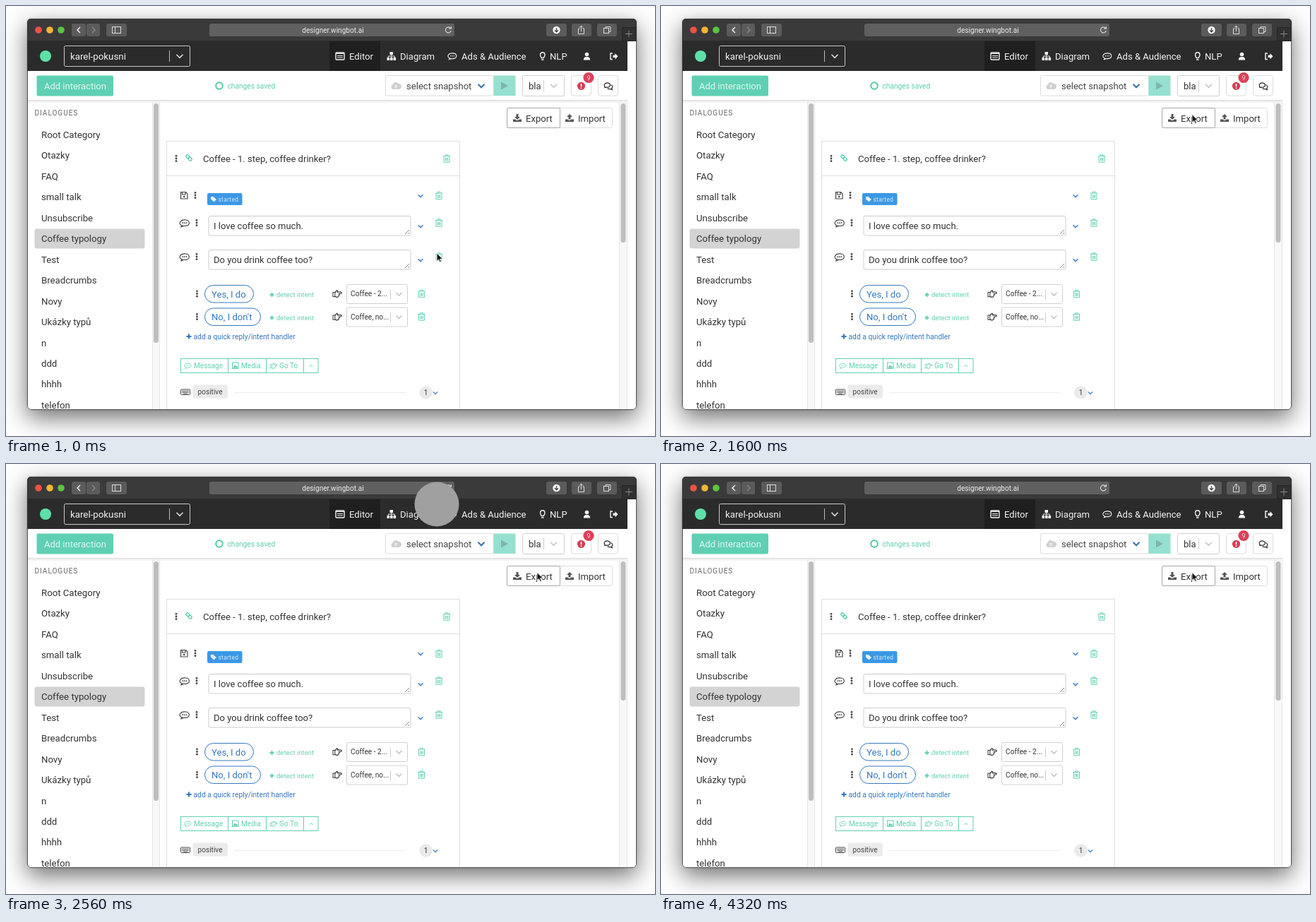
Write an HTML page that moves like this. It is 919 px wide and 609 px high and loops after 4400 ms.

```html
<!DOCTYPE html>
<html lang="en">
<head>
<meta charset="utf-8">
<title>Dialogue editor export</title>
<style>
  html, body { margin: 0; width: 100%; height: 100%; overflow: hidden; background: #fefefe; }
  #shadow {
    position: absolute; left: 30px; top: 18px; width: 863px; height: 554px; border-radius: 5px;
    box-shadow: 0 0 2px rgba(0,0,0,.35), 0 11px 33px rgba(0,0,0,.56);
  }
  svg { position: absolute; left: 0; top: 0; display: block; }
  text { font-family: Roboto, "Liberation Sans", sans-serif; white-space: pre; }
</style>
</head>
<body>
<div id="shadow"></div>
<svg id="stage" width="919" height="609" viewBox="0 0 919 609"></svg>
<script>
const GREEN = '#5fd0b3', BLUE = '#3577bf', INK = '#333';
const FRAME = 80, LOOP = 4400;

// Drawing helpers, each returning markup
const text = (x, y, s, size = 13.1, fill = INK, extra = '') =>
  `<text x="${x}" y="${y}" font-size="${size}" fill="${fill}" ${extra}>${s}</text>`;
const rect = (x, y, w, h, fill = 'none', stroke = 'none', r = 0, extra = '') =>
  `<rect x="${x}" y="${y}" width="${w}" height="${h}" rx="${r}" fill="${fill}" stroke="${stroke}" ${extra}/>`;
const circle = (x, y, r, fill, stroke = 'none', w = 1) =>
  `<circle cx="${x}" cy="${y}" r="${r}" fill="${fill}" stroke="${stroke}" stroke-width="${w}"/>`;
const line = (d, stroke, w = 1) =>
  `<path d="${d}" fill="none" stroke="${stroke}" stroke-width="${w}"/>`;
const fill = (d, color) => `<path d="${d}" fill="${color}"/>`;
const at = (x, y, ...parts) => `<g transform="translate(${x} ${y})">${parts.join('')}</g>`;
const group = (id, ...parts) => `<g id="${id}">${parts.join('')}</g>`;

// Icons, centred on x, y
const chevron = (x, y, c, s = 4, w = 1.3) => at(x, y, line(`M${-s} ${-s / 2}L0 ${s / 2}L${s} ${-s / 2}`, c, w));
const dots = (x, y) => [-3.7, 0, 3.7].map(d => circle(x, y + d, 1.4, '#444')).join('');
const plus = (x, y, c, s = 3.5) => at(x, y, line(`M${-s} 0H${s}M0 ${-s}V${s}`, c, 2));
const trash = (x, y) => at(x, y,
  line('M-5.2 -3.4H5.2M-2 -3.8V-5.2H2V-3.8M-4 -3V5.2H4V-3M-1.7 -1V3.4M0 -1V3.4M1.7 -1V3.4', GREEN, 1));
const bubble = (x, y, c, s = 1) => at(x, y, `<g transform="scale(${s})">`,
  line('M-3.6 3.6C-10 .8 -6 -4.6 0 -4.6C8.5 -4.6 8.5 4 0 4L-1.5 3.9L-5.6 5.6Z', c, 1.2),
  [-2.6, 0, 2.6].map(d => circle(d, -.3, .9, c)).join(''), '</g>');
const hand = (x, y, c, s = 1) => at(x, y, `<g transform="scale(${s})">`,
  line('M-3 -1.6L-.9 -4.4Q.6 -5 .7 -3.4L.3 -2.4H4.9Q6.3 -2.3 6.3 -1.2Q6.3 0 4.9 0H2.6Q3.5 1 2.6 2Q2.9 3.2 1.7 3.6Q1.4 4.8 0 4.8H-1.2L-3 3.8', c, 1.2),
  rect(-6, -2, 2.8, 6.2, 'none', c), '</g>');
const arrowTray = (x, y, up) => at(x, y,
  fill(up ? 'M0 -5.5L4 -1.5H1.5V2H-1.5V-1.5H-4Z' : 'M0 2.5L4 -1.5H1.5V-5.5H-1.5V-1.5H-4Z', '#555'),
  fill('M-6 2H-2.6L-1 3.6H1L2.6 2H6V5.6H-6Z', '#555'));

function titleBar() {
  const button = (x, w) => rect(x, 25, w, 18, '#5b5b5b', 'none', 3);
  return rect(30, 18, 863, 32, '#3a3a3a') + line('M30 49.5H892', '#2b2b2b')
    + circle(46, 34, 4.8, '#ed5148') + circle(62, 34, 4.8, '#f3b533') + circle(78, 34, 4.8, '#59c443')
    + button(93, 20) + button(114, 19) + button(142, 29) + button(765, 29) + button(801, 28) + button(837, 28)
    + line('M105 30L101 34L105 38', '#eee', 1.5) + line('M122 30L126 34L122 38', '#858585', 1.5)
    + rect(150.5, 29.5, 12, 9, 'none', '#ddd') + line('M154.5 29.5V38.5', '#ddd')
    + rect(288, 25, 347, 18, '#606060', 'none', 3)
    + text(463, 38, 'designer.wingbot.ai', 10.1, '#ececec', 'text-anchor="middle"')
    + line('M629.6 31.4A4 4 0 1 0 630.3 35M630.4 29V32H627', '#ddd', 1.1)
    + group('idle', circle(779.5, 34, 5.2, '#f4f4f4'), line('M779.5 31V36.4M777 34.3L779.5 36.8L782 34.3', '#444', 1.3))
    + group('busy', fill('M777.5 27H781.5V31H784.5L779.5 36L774.5 31H777.5Z', '#379df2'), rect(769, 37.5, 21, 2.5, '#379df2'))
    + line('M812.5 32H810.5V39.5H818.5V32H816.5M814.5 36V28M812 30.5L814.5 28L817 30.5', '#ddd')
    + rect(846.5, 31.5, 7, 7, 'none', '#ddd') + line('M849 31.5V29.5H856V36.5H853.5', '#ddd')
    + rect(872.5, 30.5, 20, 19, '#303030', '#252525') + line('M877 39.5H887M882 34.5V44.5', '#888');
}

function navBar() {
  const white = '#f3f3f3';
  return rect(30, 50, 850, 42, '#2b2b2b') + rect(458, 50, 72, 42, '#1f1f1f')
    + circle(56, 71, 8, '#5fe0a8')
    + rect(82.5, 56.5, 178, 29, 'none', '#c9c9c9', 2) + text(91, 76, 'karel-pokusni', 13.3, white)
    + line('M231.5 63V79', '#bbb') + chevron(246, 71, '#ddd', 4.5, 1.6)
    + rect(467, 66, 12, 10, 'none', white, 1, 'stroke-width="1.4"') + line('M467 67.5H479M469 70.5H477M469 73H477', white, 1.2)
    + text(486, 76, 'Editor', 13.1, white)
    + rect(543.5, 65, 4.5, 4, white) + [539.5, 544, 548.5].map(x => rect(x, 73, 3.6, 4, white)).join('')
    + line('M545.8 69V73M541.3 73V71H550.3V73', white) + text(558, 76, 'Diagram', 13.1, white)
    + bubble(632, 71, white, .9) + text(645, 76, 'Ads &amp; Audience', 13.1, white)
    + line('M758.2 73.5Q756.2 71 756.6 69A3.2 3.2 0 0 1 763 69Q763.2 71 761.2 73.5ZM758 76H761.5', white, 1.4)
    + text(770, 76, 'NLP', 13.1, white)
    + circle(822.5, 68.5, 2.8, white) + fill('M817.8 76.5Q818 71.4 822.5 72Q827 71.4 827.2 76.5Z', white)
    + line('M859 67H856V75.5H859', white, 1.5) + fill('M859.5 69.5H862.5V67L866.5 71.2L862.5 75.5V73H859.5Z', white);
}

function toolBar() {
  return rect(30, 92, 850, 42, '#fff') + rect(30, 133, 850, 1.5, '#dcdcdc') + rect(30, 134.5, 850, 2, '#f0f0f0')
    + rect(43.5, 98.5, 108.5, 29, GREEN, 'none', 2) + text(54, 118, 'Add interaction', 13, '#dff7f0')
    + circle(302, 113, 4.8, 'none', '#53c99b', 2) + text(313.5, 116.5, 'changes saved', 10.2, '#5fcdae')
    + rect(537.5, 98.5, 153, 28.5, '#fff', '#dcdcdc', 2)
    + fill('M548 118A3.4 3.4 0 0 1 547.6 111.5A4.2 4.2 0 0 1 555.2 109.8A3.6 3.6 0 0 1 556.6 118Z', '#cfcfcf')
    + line('M552 117V112.3M550 114L552 112L554 114', '#fff') + text(567, 118, 'select snapshot', 13.1, '#444')
    + chevron(673, 113, '#3c6fae', 4.5, 2) + rect(690.5, 98.5, 31, 28.5, '#95e0ce')
    + fill('M701 107.5L711 113L701 118.5Z', '#7fb5a8')
    + rect(731.5, 98.5, 59, 29, '#fff', '#cfcfcf', 2, 'id="langBox"') + text(740, 118, 'bla')
    + line('M761.5 105V121', '#ccc') + chevron(775.5, 113, '#c4c4c4', 4.5, 1.6)
    + rect(800.5, 98.5, 28, 28.5, '#fff', '#dcdcdc', 3) + circle(814.5, 113.3, 5.6, '#d63c55')
    + line('M814.5 110V114.2M814.5 115.4V117', '#fff', 1.6)
    + circle(825, 101.5, 7.6, '#dc4058') + text(825, 104.8, '9', 9, '#f8d5da', 'text-anchor="middle"')
    + rect(838.5, 98.5, 28, 28.5, '#fff', '#dcdcdc', 3)
    + line('M848 115.5L847.5 113.5C845.5 108 855.5 107.5 855.5 112C855.5 115 851.5 115.5 850 115Z', '#333', 1.3)
    + line('M856.5 111.5Q860.5 114 857.8 116.5L858.3 118.6L856 117.5Q853 118 851.8 116.5', '#333', 1.3);
}

function sideBar() {
  const names = ['Root Category', 'Otazky', 'FAQ', 'small talk', 'Unsubscribe', 'Coffee typology', 'Test',
    'Breadcrumbs', 'Novy', 'Ukázky typů', 'n', 'ddd', 'hhhh', 'telefon'];
  return text(40.5, 154.5, 'DIALOGUES', 10, '#666', 'letter-spacing="1"')
    + rect(40.5, 315.5, 156, 28, '#d3d3d3', 'none', 3)
    + names.map((s, i) => text(50, 187 + i * 29.45, s, 13.2)).join('')
    + rect(207, 135, 11, 436, '#f8f8f8') + line('M207.5 135V571M217.5 135V571', '#e4e4e4')
    + rect(209, 138, 7, 339, '#bebebe', 'none', 3.5)
    + rect(869, 135, 11, 436, '#f8f8f8') + line('M868.5 135V571M879.5 135V571', '#e4e4e4')
    + rect(870.5, 138, 7, 197, '#bebebe', 'none', 3.5);
}

function panel() {
  const message = (y, s) => bubble(253, y - 4, '#444') + dots(270, y - 4.5)
    + rect(287, y - 14, 286, 27.5, '#fff', '#ccc', 2) + text(294, y + 4.5, s, 13)
    + line(`M565 ${y + 11.5}L571 ${y + 5.5}M569 ${y + 11.5}L571 ${y + 9.5}`, '#888')
    + chevron(587, y + .5, BLUE, 3.5) + trash(613, y - 4.5);
  const reply = (y, w, s, target) => dots(270.5, y)
    + rect(281.5, y - 12, w, 24.5, '#fff', BLUE, 12.2) + text(291, y + 5, s, 13.1, BLUE)
    + plus(376.5, y + 1.5, GREEN, 3) + text(383, y + 4.8, 'detect intent', 9.5, GREEN)
    + hand(469, y, '#333') + rect(482.5, y - 13, 86, 27, '#fff', '#d0d0d0', 2)
    + text(488, y + 3.8, target, 10.2) + line(`M544.5 ${y - 6}V${y + 8}`, '#ccc')
    + chevron(556.5, y + .5, '#bbb', 4) + trash(588.5, y);
  return rect(227.5, 191.5, 415, 400, '#fff', '#dfdfdf') + line('M227.5 240.5H642.5', '#dfdfdf')
    + dots(241, 216) + '<g transform="rotate(45 259 215)">'
    + [254, 258.5].map(x => rect(x, 213, 5.5, 4, 'none', GREEN, 2, 'stroke-width="1.4"')).join('') + '</g>'
    + text(279, 220.5, 'Coffee - 1. step, coffee drinker?') + trash(624, 216)
    + line('M247.5 263.5H254.5L257 266V273H247.5ZM249.5 263.5V267H254V263.5', '#444', 1.2) + circle(252.2, 270, 1.3, '#444')
    + dots(268, 268) + rect(285, 265, 49.5, 17, '#3b98e6', 'none', 2)
    + fill('M290 270H293.5L298 274L294.5 277.5L290 273.5Z', '#e6f2fc')
    + text(300.5, 276.5, 'started', 8.4, '#d4e9fb', 'letter-spacing=".3"')
    + chevron(587, 269, BLUE, 3.5) + trash(613, 268.5)
    + message(311.5, 'I love coffee so much.') + message(359.5, 'Do you drink coffee too?')
    + reply(407.5, 69, 'Yes, I do', 'Coffee - 2...') + reply(440, 79, 'No, I don\'t', 'Coffee, no...')
    + plus(259, 468, BLUE) + text(265.5, 472, 'add a quick reply/intent handler', 10.3, BLUE)
    + rect(247.5, 499.5, 194.5, 20, '#fff', GREEN) + line('M314.5 499.5V519.5M368.5 499.5V519.5M421.5 499.5V519.5', GREEN)
    + bubble(257.5, 509.5, GREEN, .7) + text(266, 513, 'Message', 10.1, GREEN)
    + rect(320.5, 505, 8.5, 8.5, 'none', GREEN) + fill('M321 512.5L324 508.5L326 510.5L327 509.5L328.5 512.5Z', GREEN)
    + text(333, 513, 'Media', 10.1, GREEN)
    + hand(379, 509.5, GREEN, .8) + text(387, 513, 'Go To', 10.1, GREEN)
    + line('M429.5 511L432 508.5L434.5 511', GREEN)
    + rect(247.5, 543, 13, 7.5, 'none', '#444', 1) + line('M249 545.3H259M249 547.2H259', '#555', 1.1) + line('M251 549H257', '#555')
    + rect(264.5, 536.5, 49.5, 19, '#ebebeb', 'none', 3) + text(271.5, 549.5, 'positive', 10.1, '#444')
    + line('M323 547.5H566', '#ececec') + circle(594.5, 547.5, 9.3, '#eaeaea')
    + text(594.5, 551, '1', 10, INK, 'text-anchor="middle"') + chevron(608, 548, BLUE, 3.2);
}

function exportButtons() {
  return rect(709.5, 144.5, 149, 28, '#fff', '#dcdcdc', 3) + line('M784.5 144.5V172.5', '#dcdcdc')
    + rect(709.5, 144.5, 75, 28, 'none', '#a6a6a6', 2, 'id="exportFocus"')
    + arrowTray(724, 158.5) + text(736, 163.5, 'Export') + arrowTray(798, 158.5, true) + text(810, 163.5, 'Import');
}

function hints() {
  const hint = (x, y, s) => plus(x + 4, y - 3.5, '#aaa') + text(x + 10, y, s, 10.2, '#aaa');
  return group('hints', hint(556, 219.5, 'intent'), hint(654, 215, 'comment'),
    hint(721, 215, 'talk'), hint(525, 512.5, 'response fallback'));
}

document.getElementById('stage').innerHTML =
  `<clipPath id="window">${rect(30, 18, 863, 554, '#fff', 'none', 5)}</clipPath>
  <g clip-path="url(#window)">${rect(30, 18, 863, 554, '#fff')}
  ${sideBar()}${panel()}${hints()}${toolBar()}${exportButtons()}${titleBar()}${navBar()}</g>
  ${rect(30.5, 18.5, 862, 553, 'none', 'rgba(50,50,50,.8)', 5)}
  <circle id="flyer" fill="#a0a0a0"/>
  <path id="cursor" d="M0 0V11.5L2.7 9L4.4 13L6.4 12.2L4.7 8.3H8.3Z" fill="#111" stroke="#fff" stroke-width=".9"/>`;

const el = id => document.getElementById(id);
const clamp = v => Math.max(0, Math.min(1, v));
const ramp = (t, a, b) => clamp((t - a) / (b - a));
const ease = v => v * v * (3 - 2 * v);
const show = (id, on) => el(id).setAttribute('opacity', +on);

function draw(now) {
  const t = Math.floor((now % LOOP) / FRAME) * FRAME;

  const travel = ease(ramp(t, 160, 960)), settle = ease(ramp(t, 1200, 1520));
  el('cursor').setAttribute('transform', `translate(${610 + 142 * travel} ${350 - 213 * travel + 16.5 * settle})`);

  show('hints', .2 * ramp(t, 320, 640) * (1 - ramp(t, 1040, 1280)));
  show('exportFocus', t < 400 || t >= 1360);
  el('langBox').setAttribute('stroke', t >= 880 && t < 1280 ? '#b0b0b0' : '#cfcfcf');

  const downloading = t >= 1920 && t < 2480;
  show('busy', downloading);
  show('idle', !downloading);

  // The icon leaps from the pointer, peaks below the title bar, then falls off to the left
  const flight = (t - 2560) / 320, flying = t >= 2400 && t < 3040;
  const x = flight < 0 ? 610 - 350 * flight - 128 * flight * flight : 610 - 490 * flight - 42 * flight * flight;
  const y = 57 + (flight < 0 ? 392 : 195) * flight * flight;
  const flyer = el('flyer');
  flyer.setAttribute('cx', x);
  flyer.setAttribute('cy', y);
  flyer.setAttribute('r', 31.5 - 11.5 * Math.max(0, flight));
  show('flyer', flying ? ramp(t, 2320, 2560) : 0);
}

const start = performance.now();
function tick(now) {
  draw(Math.max(0, now - start));
  requestAnimationFrame(tick);
}
draw(0);
requestAnimationFrame(tick);
</script>
</body>
</html>
```
